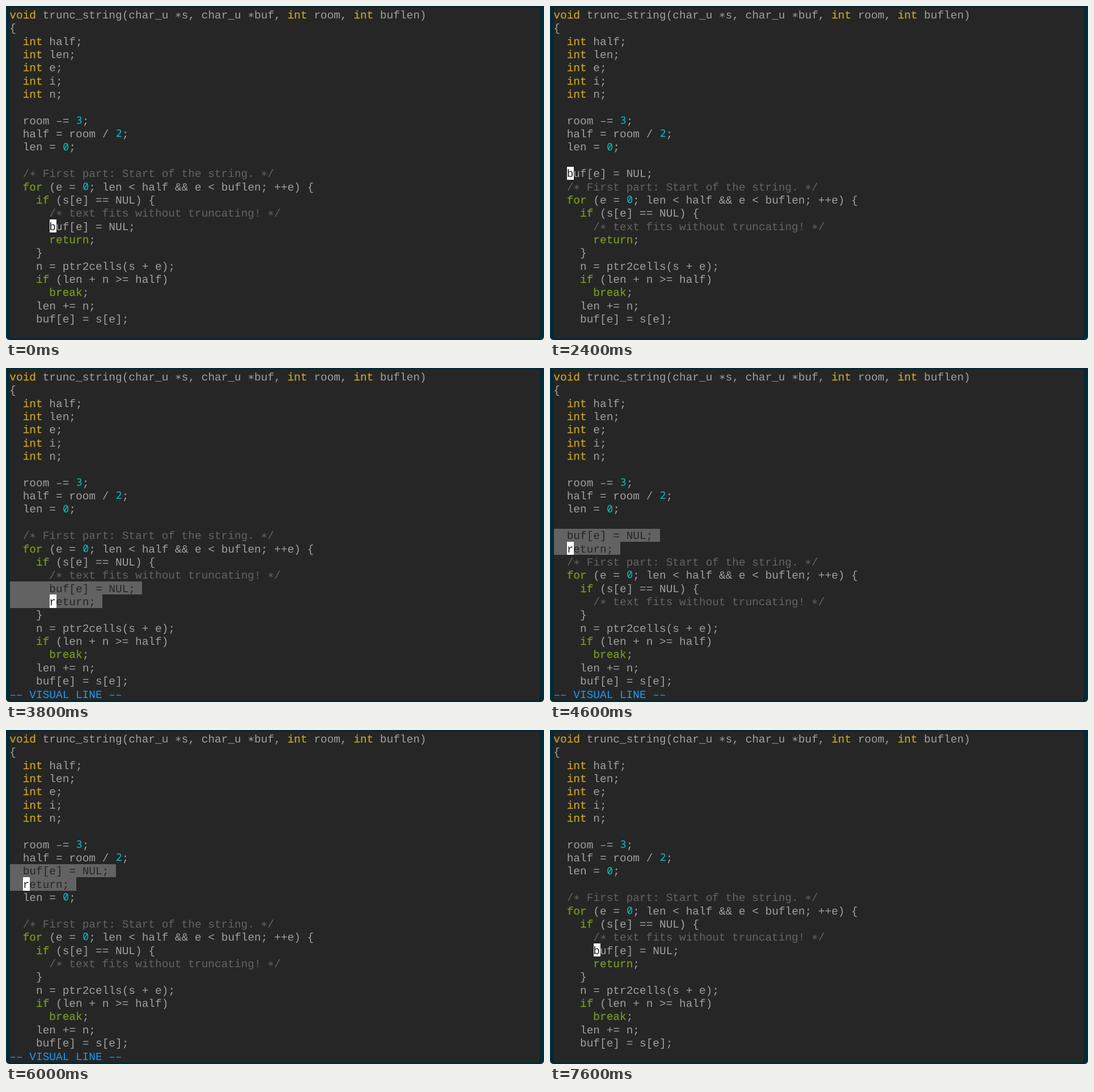
Animation, 949 px wide and 590 px high, one loop 7800 ms. Source, as an HTML page:

```html
<!DOCTYPE html>
<html>
<head>
<meta charset="utf-8">
<style>
  html, body { margin: 0; width: 100%; height: 100%; overflow: hidden; background: #fff; }
  #win { position: absolute; left: 0; top: 0; width: 949px; height: 590px; overflow: hidden;
    background: #012b35; border-radius: 0 0 6px 6px; }
  #pane { position: absolute; left: 7px; top: 3px; width: 934px; height: 584px; background: #262626; }
  #screen { position: absolute; left: 7px; top: 3.2px;
    font: 19.45px/23.36px "Liberation Mono", "DejaVu Sans Mono", monospace;
    text-rendering: geometricPrecision; color: #a0a0a0; }
  #screen * { position: absolute; white-space: pre; }
  .row { left: 0; height: 23.36px; }
  .row > span { top: 2.7px; margin-left: -0.7px; }
  .row > .block { top: 0; height: 23.36px; }
  .type { color: #c7a227; }
  .word { color: #789c18; }
  .type, .word { -webkit-text-stroke: 0.25px; }
  .row > .num { top: 0.9px; margin-left: 0; color: #00c5c7;
    font: 500 18px/23.36px "Noto Sans Mono", monospace; }
  .note { color: #646464; }
  .dark { color: #262626; }
  .mode { color: #1a9bf5; }
</style>
</head>
<body>
<div id="win"><div id="pane"></div><div id="screen"></div></div>
<script>
const CELL = 11.67, ROW = 23.36, STEP = 200, LOOP = 7800;
const HOME = 16;
const screenEl = document.getElementById('screen');

const source = `void trunc_string(char_u *s, char_u *buf, int room, int buflen)
{
  int half;
  int len;
  int e;
  int i;
  int n;

  room -= 3;
  half = room / 2;
  len = 0;

  /* First part: Start of the string. */
  for (e = 0; len < half && e < buflen; ++e) {
    if (s[e] == NUL) {
      /* text fits without truncating! */
      buf[e] = NUL;
      return;
    }
    n = ptr2cells(s + e);
    if (len + n >= half)
      break;
    len += n;
    buf[e] = s[e];`.split('\n');

// Keyframes: [step, row of the moved block, lines selected, cursor offset].
// Rows between two entries are interpolated; the selection holds.
const keys = [
  [0, 16, 0, 0], [8, 8, 0, 0], [16, 16, 0, 0],
  [17, 16, 1, 0], [18, 16, 2, 1], [19, 16, 2, 1],
  [27, 8, 2, 1], [28, 8, 2, 1], [36, 16, 2, 1],
  [37, 16, 0, 1], [38, 16, 0, 0]
];

function stateAt(step) {
  let i = keys.length - 1;
  while (keys[i][0] > step) i--;
  const [from, row, selected, cursor] = keys[i];
  const next = keys[i + 1];
  const slope = next ? (next[1] - row) / (next[0] - from) : 0;
  return { row: row + slope * (step - from), selected, cursor };
}

// The code is re-indented for the scope it lands in.
const indentAt = row => ' '.repeat(row >= 15 ? 6 : row === 14 ? 4 : 2);

function layout({ row, selected }) {
  const count = selected === 2 ? 2 : 1;
  const lines = source.slice();
  const moved = lines.splice(HOME, count).map(s => indentAt(row) + s.trim());
  lines.splice(row, 0, ...moved);
  return lines;
}

function styleOf(token) {
  if (token.startsWith('/*')) return 'note';
  if (/^(void|int)$/.test(token)) return 'type';
  if (/^(for|if|return|break)$/.test(token)) return 'word';
  return /^\d+$/.test(token) ? 'num' : '';
}

function add(parent, tag, cls, col, text = '') {
  const el = document.createElement(tag);
  el.className = cls;
  el.style.left = col * CELL + 'px';
  el.textContent = text;
  parent.append(el);
  return el;
}

function block(parent, col, cells, color) {
  const el = add(parent, 'i', 'block', col);
  el.style.width = cells * CELL + 'px';
  el.style.background = color;
}

function addRow(y) {
  const el = add(screenEl, 'div', 'row', 0);
  el.style.top = y * ROW + 'px';
  return el;
}

// Wide dashes and vertically centred asterisks.
const glyphs = s => s.replace(/-/g, '–').replace(/\*/g, '∗');

function draw(step) {
  const state = stateAt(step);
  const cursorRow = state.row + state.cursor;
  screenEl.textContent = '';
  layout(state).forEach((line, y) => {
    const el = addRow(y);
    const picked = y >= state.row && y < state.row + state.selected;
    if (picked) block(el, 0, line.length + 1, '#626262');
    const cursorCol = y === cursorRow ? line.search(/\S/) : -1;
    if (cursorCol >= 0) block(el, cursorCol, 1, '#fff');
    for (const m of line.matchAll(/\/\*.*\*\/|\w+|[^\w\s]+/g)) {
      const cls = picked ? 'dark' : styleOf(m[0]);
      let text = glyphs(m[0]), col = m.index;
      if (col === cursorCol) {
        add(el, 'span', 'dark', col, text[0]);
        text = text.slice(1);
        col++;
      }
      add(el, 'span', cls, col, text);
    }
  });
  if (state.selected) add(addRow(24), 'span', 'mode', 0, glyphs('-- VISUAL LINE --'));
}

const start = performance.now();
let shown = -1;
function tick() {
  const step = Math.floor(((performance.now() - start) % LOOP) / STEP);
  if (step !== shown) draw(shown = step);
  requestAnimationFrame(tick);
}
tick();
</script>
</body>
</html>
```
